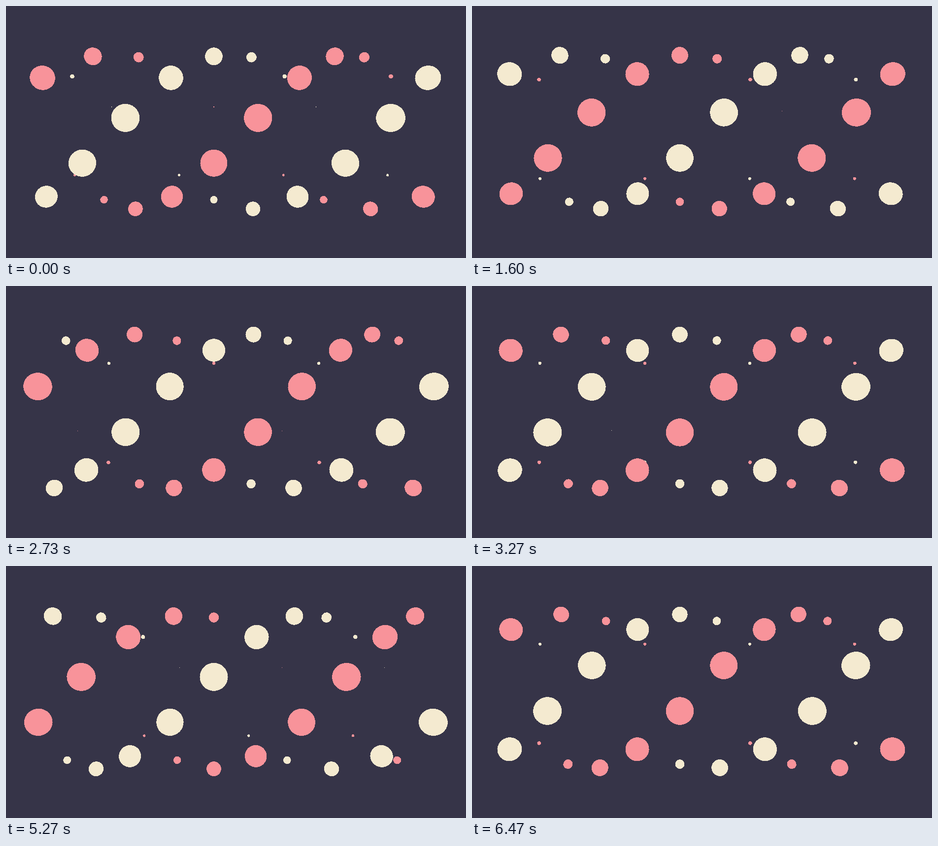
Animation, 934 px wide and 512 px high, one loop 6540 ms. Source, as an HTML page:

```html
<!DOCTYPE html>
<html lang="en">
<head>
<meta charset="utf-8">
<title>Rotating helix of spheres</title>
<style>
  html, body { margin: 0; width: 100%; height: 100%; overflow: hidden; background: #363448; }
  svg { display: block; width: 934px; height: 512px; }
</style>
</head>
<body>
<svg viewBox="0 0 934 512" shape-rendering="crispEdges"></svg>
<script>
const LOOP = 6540;
const FRAME = 200 / 3;
const LAST = 97;
const CX = 422, CY = 255;          // vanishing point
const FOCAL = 1168.6, DISTANCE = 15;
const RADIUS = 2, SPHERE = 0.16;   // cylinder radius, sphere size factor
const PINK = '#f8939a', CREAM = '#f4ead0';
const START = 21.15;               // degrees, measured from the far side

// Rotation in degrees at a few steps; close to one radian per second.
const TURN = [[0, 0], [15, 59.25], [32, 124.15], [49, 187.45], [63, 240.55], [79, 300.65], [97, 368.4]];

const svg = document.querySelector('svg');
const spheres = [];
for (let column = -4; column <= 5; column++) {
  for (let strand = 0; strand < 4; strand++) {
    spheres.push({ column, angle: 30 * (3 * strand - column), fill: strand % 2 ? CREAM : PINK });
  }
}
const nodes = spheres.map(() =>
  svg.appendChild(document.createElementNS('http://www.w3.org/2000/svg', 'ellipse')));

function turnAt(step) {
  const i = Math.max(1, TURN.findIndex(([s]) => s >= step));
  const [s0, a0] = TURN[i - 1], [s1, a1] = TURN[i];
  return a0 + (a1 - a0) * (step - s0) / (s1 - s0);
}

// Perspective outline of a sphere: an ellipse stretched away from the vanishing point.
function project({ column, angle, fill }, turn) {
  const psi = (angle + START - turn) * Math.PI / 180;
  const y = -RADIUS * Math.sin(psi);
  const z = DISTANCE + RADIUS * Math.cos(psi);
  const r = SPHERE * (1 - Math.cos(psi));
  const off = Math.hypot(column, y);
  const depth = z * z - r * r;
  return {
    z, fill,
    tilt: Math.atan2(y, column) * 180 / Math.PI,
    cx: FOCAL * off * z / depth,
    rx: FOCAL * r * Math.sqrt(off * off + depth) / depth,
    ry: FOCAL * r / Math.sqrt(depth)
  };
}

function draw(time) {
  const step = Math.min(LAST, Math.floor((time % LOOP + 5) / FRAME));
  const turn = turnAt(step);
  spheres.map(s => project(s, turn))
    .sort((a, b) => b.z - a.z)
    .forEach((p, i) => {
      const node = nodes[i];
      node.setAttribute('fill', p.fill);
      node.setAttribute('cx', p.cx);
      node.setAttribute('rx', p.rx);
      node.setAttribute('ry', p.ry);
      node.setAttribute('transform', `translate(${CX} ${CY}) rotate(${p.tilt})`);
    });
}

const begin = performance.now();
function tick() {
  draw(performance.now() - begin);
  requestAnimationFrame(tick);
}
tick();
</script>
</body>
</html>
```
